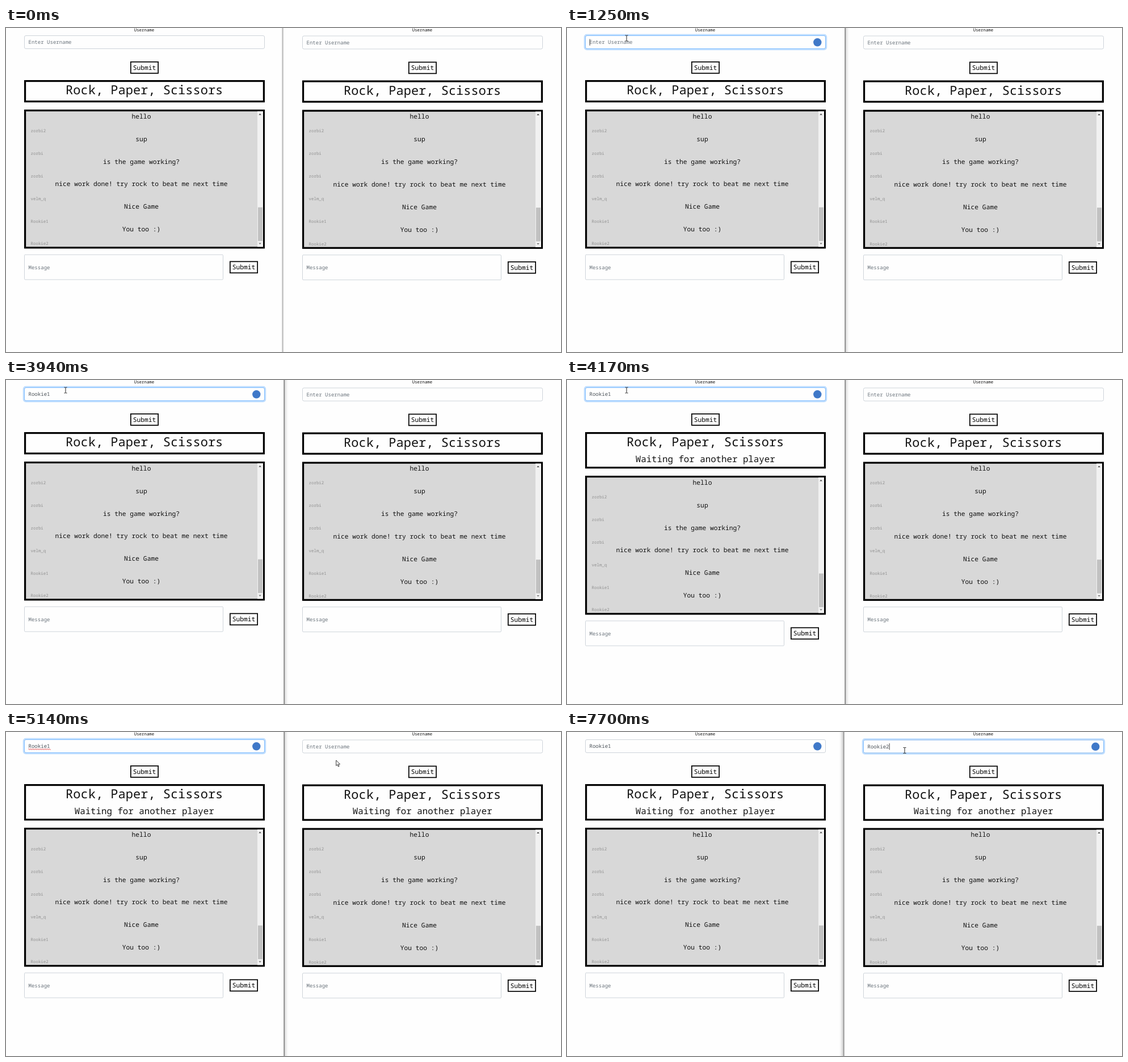
An HTML page that plays this animation: 978 px wide and 572 px high, repeating every 8000 ms.

```html
<!DOCTYPE html>
<html lang="en">
<head>
<meta charset="utf-8">
<title>Rock, Paper, Scissors</title>
<style>
  html, body { margin: 0; width: 100%; height: 100%; overflow: hidden; background: #fefefe; }
  svg { display: block; width: 978px; height: 572px; }
  text { font-family: "Noto Sans Mono", "DejaVu Sans Mono", monospace; text-rendering: geometricPrecision; }
</style>
</head>
<body>
<svg id="stage" viewBox="0 0 978 572"></svg>
<script>
const LOOP = 8000;
const CHAR = 5.43; // advance of one character in an input
const CHAT = [
  ["hello", "zorbi2"],
  ["sup", "zorbi"],
  ["is the game working?", "zorbi"],
  ["nice work done! try rock to beat me next time", "velm_q"],
  ["Nice Game", "Rookie1"],
  ["You too :)", "Rookie2"],
];
const LEFT_KEYS = [2320, 2500, 2550, 2830, 2970, 3100, 3380];
const RIGHT_KEYS = [6300, 6580, 6730, 6910, 7290, 7420, 7700];

const clamp = v => Math.max(0, Math.min(1, v));
const progress = (t, from, to) => clamp((t - from) / (to - from));
const lerp = (a, b, p) => a + (b - a) * p;
const between = (t, a, b) => t >= a && t < b;

const text = (s, x, y, size, fill = "#111", anchor = "middle") =>
  `<text x="${x}" y="${y}" font-size="${size}" fill="${fill}" text-anchor="${anchor}">${s}</text>`;

const rect = (x, y, w, h, fill, extra = "") =>
  `<rect x="${x}" y="${y}" width="${w}" height="${h}" fill="${fill}" ${extra}/>`;

// Box given by its outer size, with the border drawn inside it
const box = (x, y, w, h, line, stroke, fill = "#fefefe", r = 0) =>
  rect(x + line / 2, y + line / 2, w - line, h - line, fill,
    `stroke="${stroke}" stroke-width="${line}" rx="${r}"`);

const button = (x, y) => box(x, y, 50, 21.7, 1.7, "#000") + text("Submit", x + 25, y + 14.7, 11.28, "#000");

function usernameInput({ value, focus, icon, caret, squiggle }) {
  let out = "";
  if (focus) out += rect(30.9, 11.9, 426.2, 26.2, "none",
    `rx="4" stroke="#007bff" stroke-opacity="${0.25 * focus}" stroke-width="2.2"`);
  out += box(32, 13, 424, 24, 1, "#ced4da", "#fefefe", 2.5);
  if (focus) out += rect(32.5, 13.5, 423, 23, "none", `rx="2.5" stroke="#80bdff" stroke-opacity="${focus}"`);
  out += text(value || "Enter Username", 39.5, 28.3, 9.05, value ? "#495057" : "#6c757d", "start");
  if (squiggle) out += `<path d="M39.5 30.5${"q.75 -2 1.5 0t1.5 0".repeat(13)}" fill="none" stroke="#e03030" stroke-width=".8"/>`;
  if (caret) out += rect(39.7 + value.length * CHAR, 19.5, 0.9, 11.5, "#333");
  if (icon) out += `<circle cx="441.3" cy="25.3" r="7.2" fill="#3f78c8"/>`;
  return out;
}

function chat() {
  const rows = CHAT.map(([message, name], i) =>
    text(message, 238.5, 159.6 + 39.95 * i, 11.28) +
    text(name, 43.5, 183.7 + 39.95 * i, 7.45, "#919191", "start")).join("");
  return box(32, 144, 424, 245.4, 3.2, "#000", "#d8d8d8") + rows +
    rect(443, 147, 10, 239.4, "#f1f1f1") + rect(444, 316.6, 8, 59.5, "#c1c1c1") +
    `<path d="M445.3 153.6l2.3-2.6 2.3 2.6z" fill="#444"/><path d="M445.3 379.5l2.3 2.6 2.3-2.6z" fill="#777"/>`;
}

function pane(x, y, waiting, input) {
  const grow = waiting ? 25 : 0;
  return `<g transform="translate(${x} ${y})">` +
    text("Username", 243.5, 5.8, 7.4) + usernameInput(input) + button(219, 59) +
    box(32, 92, 424, 39.3 + grow, 3.2, "#000") +
    text("Rock, Paper, Scissors", 243.7, 117.3, 22) +
    (waiting ? text("Waiting for another player", 243.7, 144.6, 15.78) : "") +
    `<g transform="translate(0 ${grow})">${chat()}` +
    box(32, 399.7, 351, 45, 1, "#ced4da", "#fefefe", 1.5) +
    text("Message", 39.5, 425.6, 9.05, "#6c757d", "start") + button(394, 411.5) + "</g></g>";
}

// Border between the two windows; the active one casts a shadow on the other
function divider(left, right) {
  const idle = 1 - Math.max(left, right);
  const shadow = (x, dir, strength) => {
    let out = "";
    for (let i = 0; i < 8; i++)
      out += rect(x + dir * i, 0, 1, 572, "#000", `opacity="${strength * 0.2 * (1 - i / 8) ** 2}"`);
    return out;
  };
  return `<g opacity="${idle}">${rect(485, 0, 2, 572, "#eee")}${rect(487, 0, 1.5, 572, "#aaa")}</g>` +
    `<g opacity="${left}">${rect(489.4, 0, 1.3, 572, "#777")}</g>` + shadow(490, 1, left) +
    `<g opacity="${right}">${rect(487.2, 0, 1.3, 572, "#777")}</g>` + shadow(486, -1, right);
}

function pointer(t) {
  if (t < 230) return "";
  let x = 105, y = 18;
  if (t < 920) {
    const p = 1 - (1 - progress(t, 200, 920)) ** 2;
    x = lerp(788, 105, p);
    y = lerp(531, 18, p);
  } else if (t >= 4790) {
    const sweep = 1 - (1 - progress(t, 4790, 5160)) ** 2;
    const settle = progress(t, 5160, 5480);
    x = lerp(lerp(105, 583, sweep), 595, settle);
    y = lerp(lerp(18, 50, sweep), 32.5, settle);
  }
  const localX = x % 490;
  const overInput = localX > 32 && localX < 456 && y > 13 && y < 37;
  const shape = overInput
    ? `<path d="M-2.5 -5h2l.5 .5.5-.5h2M0 -4.5v9M-2.5 5h2l.5-.5.5.5h2" fill="none" stroke="#222" stroke-width="1"/>`
    : `<path d="M0 0v9.6l2.2-2 1.5 3.6 1.6-.7-1.5-3.5h3z" fill="#fff" stroke="#222" stroke-width=".9"/>`;
  return `<g transform="translate(${x.toFixed(2)} ${y.toFixed(2)})">${shape}</g>`;
}

const typed = (word, keys, t) => word.slice(0, keys.filter(k => t >= k).length);

function draw(t) {
  const rightFocus = progress(t, 5540, 5700);
  const leftFocus = progress(t, 1050, 1230) * (1 - rightFocus);
  const rightActive = progress(t, 5540, 5600);
  const leftActive = progress(t, 1050, 1120) * (1 - rightActive);
  const left = {
    value: typed("Rookie1", LEFT_KEYS, t),
    focus: leftFocus,
    icon: t >= 1200,
    caret: between(t, 1200, 1810) || between(t, 2320, 3940) || between(t, 4450, 4960) || between(t, 5450, 5540),
    squiggle: between(t, 4400, 5540),
  };
  const right = {
    value: typed("Rookie2", RIGHT_KEYS, t),
    focus: rightFocus,
    icon: t >= 5660,
    caret: t >= 5600,
  };
  document.getElementById("stage").innerHTML =
    pane(0, 0, t >= 4170, left) + pane(490, 0.5, t >= 4220, right) +
    divider(leftActive, rightActive) + pointer(t);
}

const start = performance.now();
function tick() {
  draw((performance.now() - start) % LOOP);
  requestAnimationFrame(tick);
}
tick();
</script>
</body>
</html>
```
